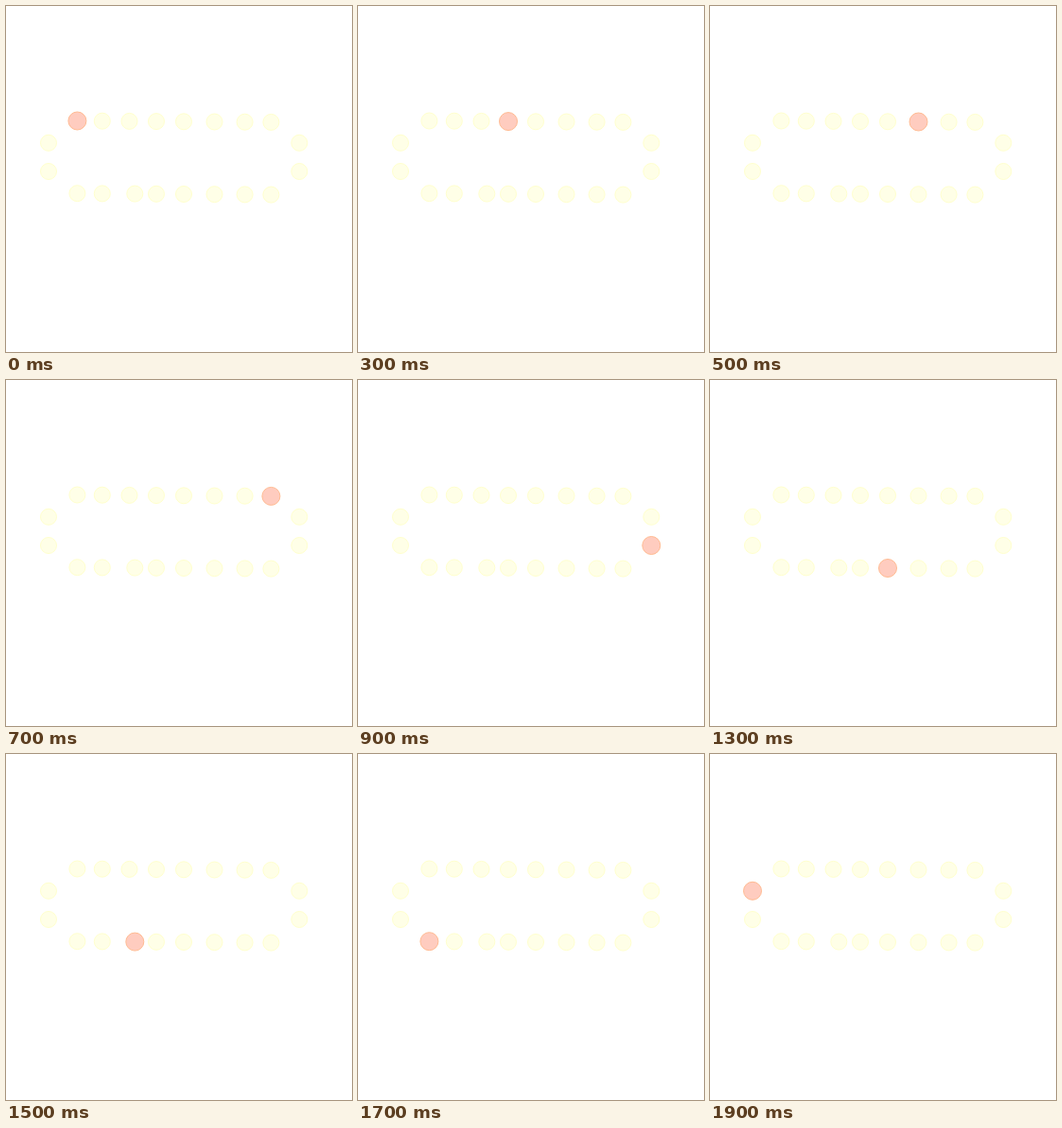
Animation of 366 by 366 pixels, one loop 2 s. Source, as an HTML page:

```html
<!DOCTYPE html>
<html lang="en">
<head>
<meta charset="utf-8">
<title>Chasing lights</title>
<style>
  html, body { margin: 0; height: 100%; overflow: hidden; background: #fff; }
  svg { display: block; width: 100vw; height: 100vh; }
  circle { fill: #ffffe7; stroke: #ffffce; stroke-width: 1; }
  circle.lit { fill: #ffccbf; stroke: #ffbb92; }
</style>
</head>
<body>
<svg viewBox="0 0 366 366"></svg>
<script>
const STEP = 100; // ms each lamp stays lit

// A slightly sloping row; its third lamp sits at a different x in each row.
const row = (thirdX, y) =>
  [75.4, 101.8, thirdX, 159, 188, 220.5, 252.6, 280.4].map((x, i) => [x, y + i * 0.2]);
const side = x => [[x, 144.8], [x, 175]];

// Clockwise from the top left.
const lamps = [
  ...row(130.5, 121.5),
  ...side(310.3),
  ...row(136.3, 198.2).reverse(),
  ...side(45).reverse()
];

const svg = document.querySelector('svg');
const circles = lamps.map(([x, y]) => {
  const circle = document.createElementNS(svg.namespaceURI, 'circle');
  circle.setAttribute('cx', x);
  circle.setAttribute('cy', y);
  return svg.appendChild(circle);
});

const start = performance.now();

function draw() {
  const elapsed = Math.max(0, performance.now() - start);
  const active = Math.floor(elapsed / STEP) % lamps.length;
  circles.forEach((circle, i) => {
    const lit = i === active;
    circle.classList.toggle('lit', lit);
    circle.setAttribute('r', lit ? 9.5 : 8.5);
  });
  requestAnimationFrame(draw);
}
draw();
</script>
</body>
</html>
```
